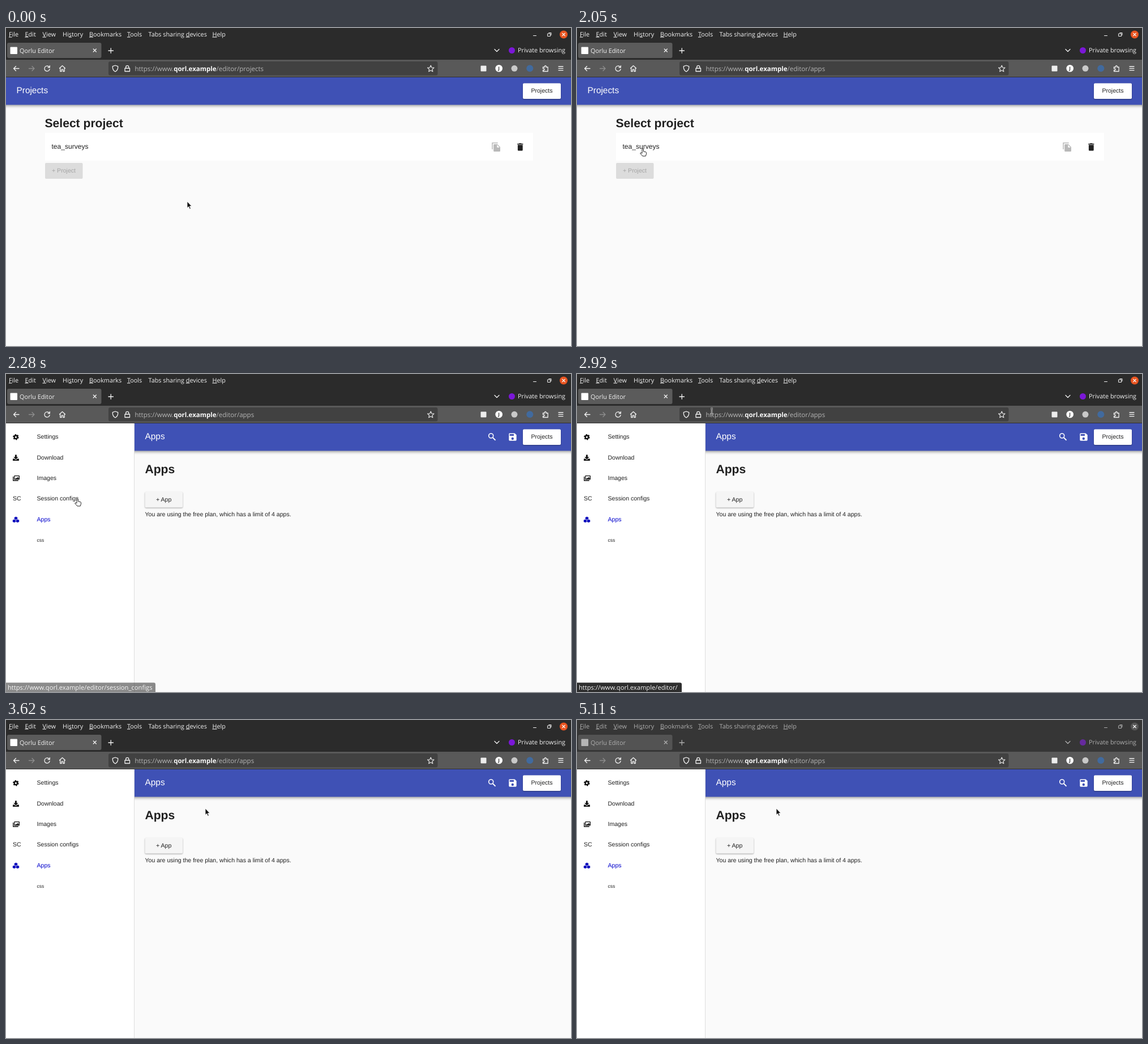
Animation, 998 px wide and 561 px high, one loop 5.19 s. Source, as an HTML page:

```html
<!DOCTYPE html>
<html lang="en">
<head>
<meta charset="utf-8">
<title>Project picker</title>
<style>
  html, body { margin: 0; width: 100%; height: 100%; overflow: hidden; background: #fafafa; }
  svg { display: block; width: 100vw; height: 100vh; }
  text { white-space: pre; text-rendering: geometricPrecision; }
  .chrome { font: 10.85px "Open Sans", "Noto Sans", sans-serif; fill: #f2f2f2; }
  .page { font: 10.55px "Liberation Sans", Arial, sans-serif; fill: #212121; }
  .url { font-size: 11.5px; fill: #b5b5b5; }
  .url .host { font-weight: bold; fill: #fbfbfb; }
  .heading { font-size: 21.1px; font-weight: bold; }
  .bar { font-size: 15.4px; fill: #fff; }
  .mid { text-anchor: middle; }
  .line { fill: none; stroke: #f2f2f2; stroke-width: 1.3; stroke-linecap: round; stroke-linejoin: round; }
  .raised { filter: drop-shadow(0 1px 1.2px rgba(0, 0, 0, .35)); }
  .header { fill: #3f51b5; filter: drop-shadow(0 2px 2.5px rgba(0, 0, 0, .38)); }
  u, .key { text-decoration: underline; }
</style>
</head>
<body>
<svg viewBox="0 0 998 561">
  <rect width="998" height="561" fill="#fafafa"/>
  <rect class="header" x="-10" y="80" width="1018" height="55.5"/>

  <g id="projectsPage" class="page">
    <text class="bar" x="18.5" y="115">Projects</text>
    <text class="heading" x="68.5" y="174.7">Select project</text>
    <rect x="69" y="185" width="862" height="49" fill="#fff"/>
    <text x="80.5" y="212.7" font-size="12.05">tea_surveys</text>
    <g fill="#b9b9b9">
      <path d="M859 214V202.800H868.700" fill="none" stroke="#b9b9b9" stroke-width="1.500"/>
      <path fill-rule="evenodd" d="M862.500 205h5.500l5 5v6.700q0 1.300-1.300 1.300h-9.200q-1.300 0-1.300-1.300v-10.400q0-1.300 1.300-1.300zM867.300 206v4.800h4.500z"/>
    </g>
    <path d="M903.200 204h2.600l.7-.8h3.600l.7.8h2.600v1.500h-10.200zM903.900 206.300h8.800v8.900q0 1.400-1.400 1.400h-6q-1.400 0-1.400-1.400z"/>
    <rect x="69" y="238" width="66.500" height="28" rx="2" fill="#dcdcdc"/>
    <text class="mid" x="102" y="255.300" fill="#a3a3a3">+ Project</text>
  </g>

  <g id="appsPage" class="page">
    <text class="bar" x="245.500" y="115">Apps</text>
    <text class="heading" x="245.500" y="174.700">Apps</text>
    <rect class="raised" x="245.500" y="208" width="66.500" height="27.500" rx="2" fill="#f5f5f5"/>
    <text class="mid" x="278.700" y="225">+ App</text>
    <text x="245.500" y="250.700">You are using the free plan, which has a limit of 4 apps.</text>
    <g fill="none" stroke="#fff">
      <circle cx="856.700" cy="109" r="4" stroke-width="1.600"/>
      <path d="M859.800 112.100l4.700 4.800" stroke-width="2"/>
    </g>
    <path fill="#fff" fill-rule="evenodd" d="M889.700 104.500h8.800l3.200 3v8.800q0 1.400-1.400 1.400h-10.600q-1.400 0-1.400-1.400v-10.400q0-1.400 1.400-1.400zM889.700 106v3h7.300v-3zM892.600 114a2.200 2.200 0 1 0 4.400 0a2.200 2.200 0 1 0-4.400 0z"/>

    <rect y="86" width="226.500" height="475" fill="#fff"/>
    <path d="M226.500 86V561" stroke="#dedede"/>
    <g fill="none" stroke="#111">
      <circle cx="17.400" cy="111.300" r="2.800" stroke-width="2.400"/>
      <circle cx="17.400" cy="111.300" r="4.400" stroke-width="1.800" stroke-dasharray="2.300"/>
    </g>
    <path fill="#111" d="M15.900 142.500h3v4h2.700l-4.200 4.200-4.200-4.200h2.700zM12 149.500h2.800l2.600 2.300 2.600-2.300h2.900v3.500h-10.900z"/>
    <g fill="none" stroke="#111" stroke-width="1.300">
      <path d="M12.700 181v7h9"/>
      <rect x="14.800" y="179.700" width="8.600" height="6.200" rx=".7"/>
      <path fill="#111" d="M16 185l2-2 1 1 2-2.500 2 3.500z" stroke="none"/>
    </g>
    <g fill="#0000bb" stroke="#fff" stroke-width=".6">
      <path id="cube" d="M17.500 251.500l3 1.300v3.300l-3 1.400-3-1.400v-3.300z"/>
      <use href="#cube" x="-2.900" y="4.800"/>
      <use href="#cube" x="2.900" y="4.800"/>
    </g>
    <text x="54.500" y="114.300">Settings</text>
    <text x="54.500" y="150.700">Download</text>
    <text x="54.500" y="187.100">Images</text>
    <text x="12" y="223.400">SC</text>
    <text x="54.500" y="223.400">Session configs</text>
    <text x="54.500" y="259.800" style="fill:#0000cc">Apps</text>
    <text x="54.500" y="296" font-size="8.400">css</text>
  </g>

  <g class="page">
    <rect class="raised" x="913" y="97.500" width="67" height="27.500" rx="2" fill="#fff"/>
    <text class="mid" x="946.500" y="114.300">Projects</text>
  </g>

  <g id="status" class="chrome">
    <path id="statusBox" fill="#2e2e2e"/>
    <text id="statusText" x="3" y="557" font-size="11.200"></text>
  </g>

  <g class="chrome">
    <rect width="998" height="56" fill="#2b2b2b"/>
    <rect y="56" width="998" height="30" fill="#595959"/>
    <rect y="86" width="998" height="1" fill="#303030"/>
    <g id="menu"></g>
    <path class="line" d="M931.500 13.500h5M957 10h4.500v4.500h-4.500zM958.800 8.500h4.200v4.200" stroke-width="1" style="stroke-width:1"/>
    <rect x="2" y="26" width="166.500" height="27" rx="3" fill="#5b5b5b"/>
    <rect x="7.500" y="33.500" width="12.500" height="12.500" rx="1" fill="#fff"/>
    <text x="24" y="43.700">Qorlu Editor</text>
    <path class="line" d="M154.300 37l5 5m0-5l-5 5M181 40h8.500M185.250 35.750v8.500M863 37.500l4 4 4-4"/>
    <circle cx="893.500" cy="39.500" r="5.500" fill="#7b17d8"/>
    <text x="904" y="43.400">Private browsing</text>
    <rect id="backdrop" width="998" height="56" fill="#484848"/>
    <circle id="closeButton" cx="985" cy="11.500" r="7"/>
    <path class="line" d="M982.700 9.200l4.600 4.600m0-4.600l-4.600 4.600"/>

    <rect x="181" y="59" width="581.500" height="24.500" rx="3" fill="#414141"/>
    <path class="line" d="M23 71.500H13.500m4-4l-4 4 4 4"/>
    <path class="line" d="M40.500 71.500H50m-4-4l4 4-4 4" style="stroke:#8d8d8d"/>
    <path class="line" d="M76.600 69.300a4.600 4.600 0 1 0 .5 3.200M77.300 66.500v3.200h-3.200"/>
    <path class="line" d="M94.500 71l5-4.500 5 4.500M95.800 70.500v6h2.400v-3.300h2.600v3.300h2.400v-6"/>
    <path class="line" d="M193 66l4.700 1.700q.4 6.500-4.700 9.300-5.100-2.800-4.700-9.300z"/>
    <path class="line" d="M210 71h8.500v5.500h-8.500zM211.700 71v-2a2.550 2.550 0 0 1 5.100 0v2"/>
    <path id="star" class="line" style="stroke-width:1.100"/>
    <text class="url" x="227.500" y="75.500">https://www.<tspan class="host">qorl.example</tspan>/editor/<tspan id="route"></tspan></text>
    <rect x="838.500" y="66.500" width="10" height="10" rx="1" fill="#ededed"/>
    <circle cx="870.700" cy="71.300" r="6.300" fill="#fff"/>
    <text class="mid" x="870.700" y="74.300" font-size="8" style="fill:#333;font-weight:bold">J</text>
    <circle cx="898" cy="71.300" r="5.500" fill="#c9c9c9"/>
    <circle cx="925.300" cy="71.300" r="6" fill="#416a9e"/>
    <path class="line" d="M948.500 69h3v-1.400a1.300 1.300 0 0 1 2.600 0v1.400h3v7.500h-8.600v-2h1.300a1.300 1.300 0 0 0 0-2.800h-1.300z"/>
    <path class="line" d="M976 68h8M976 71.300h8M976 74.600h8"/>
  </g>

  <g id="cursor" stroke-linejoin="round">
    <path data-shape="arrow" fill="#111" stroke="#fff" stroke-width=".8" d="M0 0v11.500l2.600-2.400 1.900 4.300 1.900-.8-1.900-4.100h3.500z"/>
    <path data-shape="hand" fill="#fff" stroke="#222" d="M4 9V2a1.200 1.200 0 0 1 2.400 0v3.800l3.600.7q1.700.4 1.600 2.100l-.4 2.600-1 2.800h-5.200l-3.900-4.200q-.8-1.700.9-1.700z"/>
    <path data-shape="beam" fill="none" stroke="#fff" stroke-width="2.400" d="M-2 .5h4M0 .5v11M-2 11.500h4"/>
    <path data-shape="beam" fill="none" stroke="#111" stroke-width="1" d="M-2 .5h4M0 .5v11M-2 11.500h4"/>
  </g>
</svg>
<script>
const LOOP = 5190;
const SITE = "https://www.qorl.example/editor/";
const $ = id => document.getElementById(id);
const show = (node, on) => { node.style.display = on ? "" : "none"; };

// An underscore precedes each menu's access key.
const menu = [[5, "_File"], [33.5, "_Edit"], [64.5, "_View"], [100, "Hi_story"], [147, "_Bookmarks"],
  [214, "_Tools"], [251.5, "Tabs sharing _devices"], [364.5, "_Help"]];
$("menu").innerHTML = menu.map(([x, label]) =>
  `<text x="${x}" y="14.500">${label.replace(/_(.)/, '<tspan class="key">$1</tspan>')}</text>`).join("");

$("star").setAttribute("d", "M" + Array.from({ length: 10 }, (_, i) => {
  const radius = i % 2 ? 2.8 : 6, angle = (i / 5 - .5) * Math.PI;
  return `${750.3 + radius * Math.cos(angle)} ${72 + radius * Math.sin(angle)}`;
}).join("L") + "Z");

// Each pose holds until the next: time, pointer shape, x, y.
const poses = [
  [0, "arrow", 320, 306], [100, "arrow", 190, 250], [170, "hand", 83, 207],
  [340, "hand", 84, 206], [420, "hand", 90, 205], [500, "hand", 99, 206], [570, "hand", 105, 207],
  [2050, "hand", 111, 212], [2130, "hand", 114, 215], [2210, "hand", 118, 217], [2280, "hand", 121, 219],
  [2360, "hand", 122, 220], [2440, "hand", 123, 221], [2520, "hand", 123, 221],
  [2600, "hand", 126, 212], [2680, "hand", 140, 185], [2760, "hand", 165, 150], [2840, "hand", 202, 105],
  [2920, "beam", 238, 60.5], [3000, "arrow", 335, 88], [3080, "arrow", 428, 129],
  [3150, "arrow", 478, 140], [3230, "arrow", 489, 152], [3310, "arrow", 472, 160],
  [3390, "arrow", 440, 163], [3470, "arrow", 400, 161], [3550, "arrow", 366, 158], [3620, "arrow", 352, 156]
];

function drawCursor(t) {
  const [, shape, x, y] = poses.findLast(pose => pose[0] <= t);
  $("cursor").setAttribute("transform", `translate(${x} ${y})`);
  for (const node of $("cursor").children) show(node, node.dataset.shape === shape);
}

function drawStatus(t) {
  const onConfigs = t < 2760, width = onConfigs ? 264 : 185;
  show($("status"), t >= 2280 && t < 3150);
  $("status").style.opacity = t < 2360 ? .55 : 1;
  $("statusText").textContent = SITE + (onConfigs ? "session_configs" : "");
  $("statusBox").setAttribute("d", `M0 544.500H${width - 3}q3 0 3 3V561H0z`);
}

function drawFocus(t) {
  const fade = [4950, 5030, 5110].filter(time => t >= time).length / 3;
  const mix = (from, to) => from + (to - from) * fade;
  $("backdrop").style.opacity = .4 * fade;
  $("closeButton").setAttribute("fill", `rgb(${mix(233, 86)},${mix(84, 86)},${mix(32, 86)})`);
}

function frame(now) {
  const t = now % LOOP;
  const opened = t >= 2130;
  show($("projectsPage"), !opened);
  show($("appsPage"), opened);
  $("route").textContent = t < 2050 ? "projects" : "apps";
  drawStatus(t);
  drawFocus(t);
  drawCursor(t);
  requestAnimationFrame(frame);
}
frame(performance.now());
</script>
</body>
</html>
```
